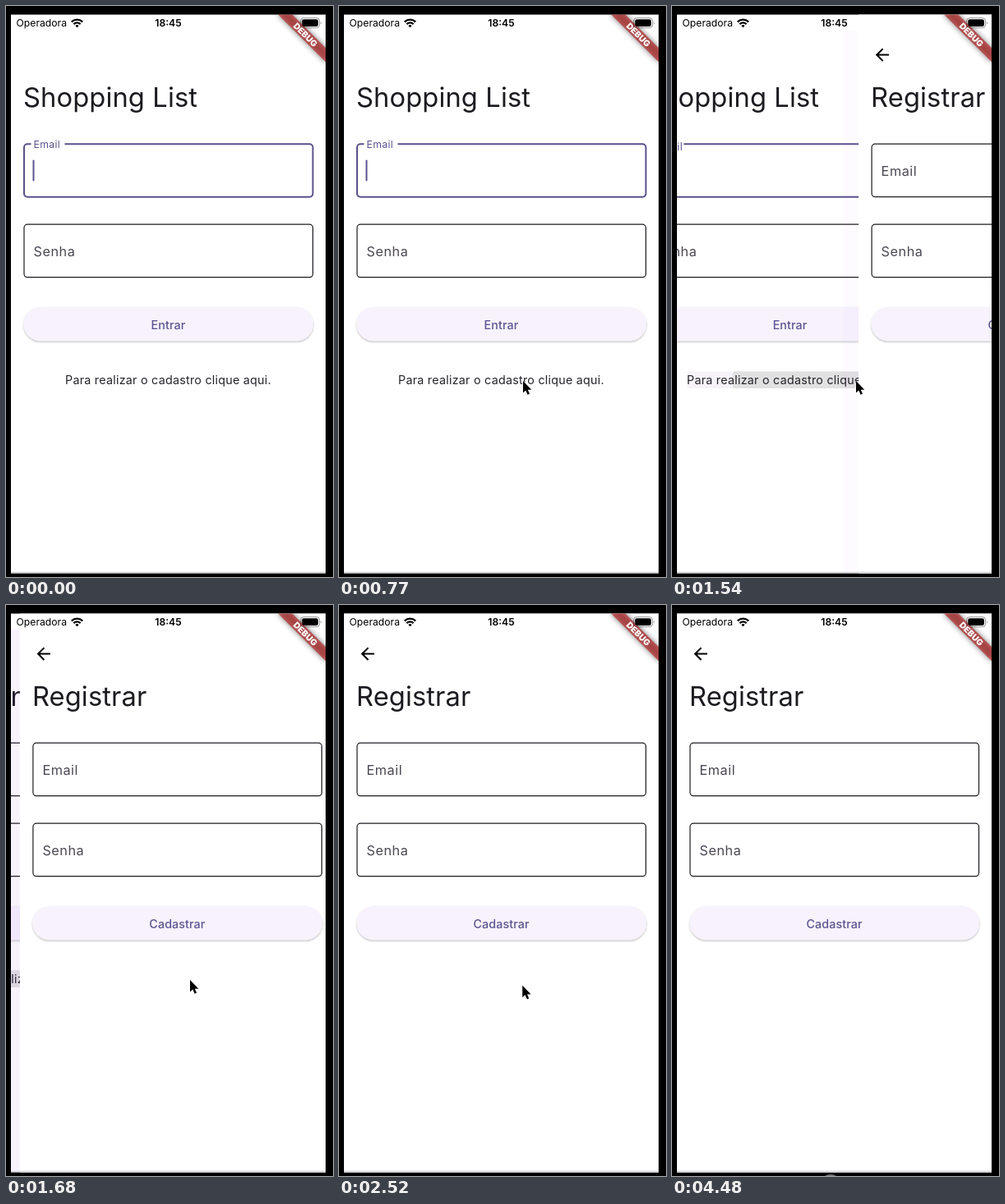
Animation of 398x696 px, one loop 4550 ms. Source, as an HTML page:

```html
<!DOCTYPE html>
<html lang="pt">
<head>
<meta charset="utf-8">
<title>Shopping List</title>
<style>
html, body { margin: 0; width: 100%; height: 100%; overflow: hidden; background: #000; }
svg { display: block; width: 398px; height: 696px; font-family: Inter, Roboto, sans-serif; }
.title { font-size: 32.7px; letter-spacing: .1px; fill: #1d1b20; }
.label { font-size: 16.3px; letter-spacing: .5px; fill: #4b4753; }
.btn { font-size: 14.3px; font-weight: 500; letter-spacing: .1px; fill: #5c5591; text-anchor: middle; }
.link { font-size: 14.3px; letter-spacing: .25px; fill: #25232a; }
.bar { font-size: 12.2px; fill: #000; }
.field { fill: none; stroke: #1d1b20; stroke-width: 1.2; }
.focus { stroke: #58528a; stroke-width: 2; }
.accent { fill: #5c5591; }
</style>
</head>
<body>
<svg viewBox="0 0 398 696">
  <defs>
    <clipPath id="screen"><rect x="6" y="10.5" width="383" height="681"/></clipPath>
    <clipPath id="linkBox"><rect x="72.5" y="445.5" width="250" height="20.5"/></clipPath>
    <filter id="soft" x="-20%" y="-100%" width="140%" height="300%"><feGaussianBlur stdDeviation="3.6"/></filter>
    <filter id="lift" x="-5%" y="-20%" width="110%" height="150%">
      <feDropShadow dx="0" dy="1.2" stdDeviation=".9" flood-color="#000" flood-opacity=".3"/>
    </filter>
    <rect id="box" x="22" y="168.2" width="351.5" height="64.5" rx="4.1"/>
    <rect id="pill" x="21.5" y="367.3" width="352.5" height="41" rx="20.5" fill="#f7f2fc" filter="url(#lift)"/>
  </defs>
  <rect width="398" height="696" fill="#000"/>
  <g clip-path="url(#screen)">
    <rect x="6" y="10" width="383" height="682" fill="#fff"/>

    <g id="login">
      <text class="title" x="21" y="123">Shopping List</text>
      <use id="emailBox" href="#box" class="field focus"/>
      <rect id="gap" x="30.5" y="165" height="6" fill="#fff"/>
      <text id="email" class="label">Email</text>
      <rect id="caret" class="accent" x="32.5" y="187.5" width="2" height="26" rx="1"/>
      <use href="#box" class="field" y="98"/>
      <text class="label" x="33.5" y="304.8">Senha</text>
      <use href="#pill"/>
      <text class="btn" x="197.5" y="393.5">Entrar</text>
      <g clip-path="url(#linkBox)">
        <rect id="hover" x="72" y="445" width="252" height="22" fill="#f5f3f8"/>
        <circle id="ripple" cx="224" cy="457" fill="#e1e1e1"/>
      </g>
      <text class="link" x="72" y="460.8">Para realizar o cadastro clique aqui.</text>
    </g>

    <g id="signup">
      <rect id="edge" x="-13" y="30" width="19" height="662" fill="#8a26de"/>
      <rect x="6" y="10" width="383" height="682" fill="#fff"/>
      <path transform="translate(22.6 47.3) scale(1.02)" d="M20 11H7.83l5.59-5.59L12 4l-8 8 8 8 1.41-1.41L7.83 13H20z"/>
      <text class="title" x="21" y="123">Registrar</text>
      <use href="#box" class="field"/>
      <text class="label" x="33.5" y="206.8">Email</text>
      <use href="#box" class="field" y="98"/>
      <text class="label" x="33.5" y="304.8">Senha</text>
      <use href="#pill"/>
      <text class="btn" x="197.5" y="393.5">Cadastrar</text>
    </g>

    <g transform="translate(389 10.5) rotate(45)">
      <rect x="-41" y="28.6" width="82" height="12.3" opacity=".5" filter="url(#soft)"/>
      <rect x="-60" y="28.6" width="120" height="12.3" fill="#b71c1c" fill-opacity=".63"/>
      <text y="38.5" font-size="10.4" font-weight="900" fill="#fff" text-anchor="middle">DEBUG</text>
    </g>

    <text class="bar" x="12.5" y="25.3">Operadora</text>
    <text class="bar" x="197.5" y="25.3" font-weight="600" text-anchor="middle">18:45</text>
    <g fill="none" stroke="#000" stroke-width="2.2">
      <path d="M79.8 19.4a9.6 9.6 0 0 1 13.4 0M82.4 22.1a5.8 5.8 0 0 1 8.2 0"/>
      <path d="M86.5 26.3l-2.1-2.2a3 3 0 0 1 4.2 0z" fill="#000" stroke="none"/>
    </g>
    <rect x="358.6" y="14.6" width="23" height="12" rx="3.6" fill="none" stroke="#000" stroke-opacity=".4"/>
    <rect x="360.3" y="16.2" width="19.6" height="8.8" rx="2.2"/>
    <path d="M382.9 18.6q1.6 2 0 4z" fill-opacity=".45"/>
    <rect x="6" y="689.6" width="383" height="2" fill="#d8d8dc"/>
  </g>
  <path id="pointer" d="M0 0V14.6L3.3 11.6 5.6 16.8 8 15.8 5.8 10.7H10.3Z" stroke="#fff" stroke-width="1" paint-order="stroke"/>
  <circle id="dot" cx="193" cy="707" r="13" fill="#777"/>
</svg>
<script>
const LOOP = 4550, STEP = 70, WIDTH = 383;
const el = id => document.getElementById(id);
const set = (id, attrs) => {
  for (const k in attrs) el(id).setAttribute(k, attrs[k]);
};
const clamp = v => Math.min(1, Math.max(0, v));
const ramp = (t, from, to) => clamp((t - from) / (to - from));
const mix = (a, b, k) => a + (b - a) * k;
const easeOut = k => 1 - (1 - k) ** 2;
const easeIn = k => k * k;

const bez = (p, s) => {
  const r = 1 - s;
  return p[0] * r ** 3 + 3 * p[1] * s * r * r + 3 * p[2] * s * s * r + p[3] * s ** 3;
};

// Fast start and long settle, from two joined cubic curves
function slide(k) {
  const [xs, ys] = k < .198
    ? [[0, .056, .108, .198], [0, .024, .3085, .541]]
    : [[.198, .3655, .5465, 1], [.541, 1, .989, 1]];
  let lo = 0, hi = 1;
  for (let i = 0; i < 24; i++) {
    const mid = (lo + hi) / 2;
    if (bez(xs, mid) < k) lo = mid; else hi = mid;
  }
  return bez(ys, lo);
}

// [start, end, from x, from y, to x, to y, easing]
const moves = [
  [70, 560, 351, 636, 221, 478, easeOut],
  [560, 770, 221, 478, 224, 457, easeOut],
  [1960, 2100, 224, 457, 223.5, 462, easeOut],
  [2450, 2800, 223.5, 462, 217, 506, easeIn]
];

function movePointer(t) {
  const m = moves.filter(m => t >= m[0]).pop();
  const shown = m && t < 2870;
  set('pointer', { visibility: shown ? 'visible' : 'hidden' });
  if (!shown) return;
  const k = m[6](ramp(t, m[0], m[1]));
  set('pointer', { transform: `translate(${mix(m[2], m[4], k)} ${mix(m[3], m[5], k)})` });
}

function draw(t) {
  const k = ramp(t, 1490, 1810), p = slide(k);
  set('login', { transform: `translate(${-p * WIDTH / 3} 0)` });
  set('signup', { transform: `translate(${(1 - p) * WIDTH} 0)`, visibility: k ? 'visible' : 'hidden' });
  set('edge', { opacity: .1 * k });

  const float = 1 - ramp(t, 1528, 1680);
  const focused = t < 1600;
  set('email', {
    transform: `translate(33.5 ${mix(206.8, 173.4, float)}) scale(${mix(1, .75, float)})`,
    class: 'label' + (focused ? ' accent' : '')
  });
  el('email').style.fill = focused ? '#5c5591' : '';
  set('gap', { width: 41 * float });
  set('emailBox', { class: focused ? 'field focus' : 'field' });
  set('caret', { opacity: t < 1540 ? Math.max(1 - ramp(t, 30, 190), ramp(t, 390, 550)) : 0 });

  set('hover', { opacity: ramp(t, 1120, 1260) });
  set('ripple', { r: t < 1190 ? 0 : 96 * ramp(t, 1120, 1540) });

  movePointer(t);
  set('dot', { visibility: t >= 4480 ? 'visible' : 'hidden' });
}

const start = performance.now();
function tick() {
  const t = (performance.now() - start) % LOOP;
  draw(Math.floor(t / STEP) * STEP);
  requestAnimationFrame(tick);
}
tick();
</script>
</body>
</html>
```
